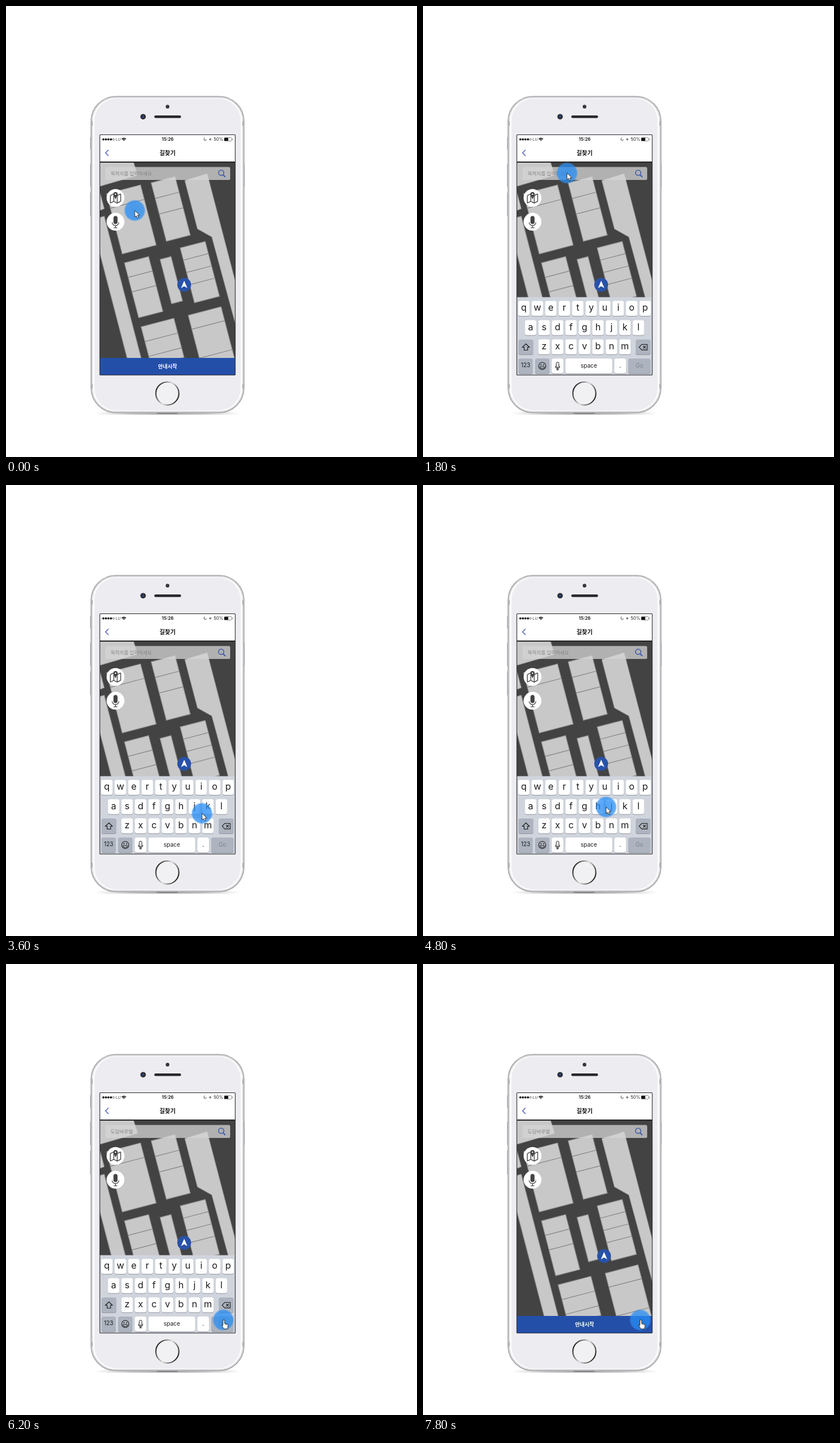
These frames come from a looping animation (715x783 px, 8 s). An HTML page with a canvas:

```html
<!DOCTYPE html>
<html lang="ko">
<head>
<meta charset="utf-8">
<title>길찾기</title>
<style>
html, body { margin: 0; width: 100%; height: 100%; overflow: hidden; background: #fff; }
canvas { display: block; }
</style>
</head>
<body>
<canvas id="stage" width="715" height="783"></canvas>
<script>
const ctx = document.getElementById('stage').getContext('2d');
const LOOP = 8000, STEP = 200;
const TYPE_ON = 1800, FILLED = 5600, HAND_ON = 5800, TYPE_OFF = 7400;
const KO = '"Noto Sans CJK KR", "Noto Sans CJK", sans-serif';
const EN = 'Inter, Roboto, sans-serif';
const INK = '#1c1c1c', LAND = '#c8c8c8', EDGE = '#909090', ACCENT = '#3c59ad';

function paint(fill, stroke, lw = 1) {
  if (fill) { ctx.fillStyle = fill; ctx.fill(); }
  if (stroke) { ctx.strokeStyle = stroke; ctx.lineWidth = lw; ctx.stroke(); }
}

function box(x, y, w, h, r, ...style) {
  ctx.beginPath();
  ctx.roundRect(x, y, w, h, r);
  paint(...style);
}

function disc(x, y, r, ...style) {
  ctx.beginPath();
  ctx.arc(x, y, r, 0, Math.PI * 2);
  paint(...style);
}

function arc(x, y, r, from, to, color, lw) {
  ctx.beginPath();
  ctx.arc(x, y, r, from * Math.PI, to * Math.PI);
  paint(null, color, lw);
}

function trace(points) {
  ctx.beginPath();
  for (let i = 0; i < points.length; i += 2) ctx.lineTo(points[i], points[i + 1]);
}

function poly(points, ...style) {
  trace(points);
  ctx.closePath();
  paint(...style);
}

function line(points, color, lw) {
  trace(points);
  paint(null, color, lw);
}

function text(s, x, y, font, color, align = 'center') {
  ctx.font = font;
  ctx.fillStyle = color;
  ctx.textAlign = align;
  ctx.fillText(s, x, y);
}

function at(x, y, turn, fn) {
  ctx.save();
  ctx.translate(x, y);
  ctx.rotate(turn);
  fn();
  ctx.restore();
}

function gradient(x0, y0, x1, y1, ...stops) {
  const g = ctx.createLinearGradient(x0, y0, x1, y1);
  stops.forEach((c, i) => g.addColorStop(i / (stops.length - 1), c));
  return g;
}

function drawPhone() {
  // ground shadow
  box(155, 705, 252, 4.5, 2, gradient(155, 0, 407, 0, '#fff', '#c4c4c6', '#a8a8aa', '#c4c4c6', '#fff'));
  box(262, 704, 37, 3.5, 1, '#4c4c4e');
  // side buttons
  for (const [x, y, h] of [[146.5, 227, 22], [146.5, 273, 41], [146.5, 323, 42], [412, 273, 41]])
    box(x, y + .5, 3, h, 1.5, '#e6e6e8', '#b2b2b6', .8);
  // body
  box(148, 157, 266, 549, 43, '#fbfbfc', '#a3a3a6', 1.6);
  box(149.8, 158.8, 262.4, 545.4, 41, null, '#d2d2d5', 1.6);
  box(154, 161, 254, 541, 38, '#ededf1');
  for (const y of [200, 656])
    for (const x of [147, 411]) box(x, y, 4, 8, 0, '#b5b5b8');
  // sensors
  disc(281, 174.7, 3.2, '#38383b');
  box(258, 190, 46.5, 4.6, 2.3, '#29292c');
  disc(238.5, 192.2, 4.8, '#2d2e35');
  disc(238.3, 192, 2, '#28468d');
  // home button
  disc(280.7, 672.7, 20, '#f1f1f4', gradient(262, 664, 299, 681, '#222', '#777', '#ddd', '#777', '#222'), 2);
}

function drawHeader() {
  ctx.fillStyle = '#fff';
  ctx.fillRect(163, 223, 236, 47);
  for (let i = 0; i < 4; i++) disc(169.4 + i * 4.4, 231.6, 1.9, '#111');
  disc(187, 231.6, 1.6, null, '#222', .6);
  text('LU', 190.8, 231.7, '6.4px ' + EN, '#333', 'left');
  for (const r of [1, 3, 5]) arc(205, 234.4, r, -.77, -.23, '#111', 1.3);
  text('15:26', 281.3, 231.7, '600 7.8px ' + EN, '#111');
  arc(346.6, 231, 2.2, .1, 1.4, '#777', 1.2);
  disc(355.3, 231.5, 2, '#8a8a8a');
  text('50%', 361.3, 231.7, '7.6px ' + EN, '#222', 'left');
  box(379.5, 228.5, 13, 6, 1, '#fff', '#777', .8);
  box(380, 229, 6.6, 5, .5, '#111');
  box(393.6, 230.2, 1.2, 2.6, .5, '#777');
  line([178.3, 249.8, 173.2, 255, 178.3, 260.2], '#5562bd', 1.5);
  text('길찾기', 281, 255, 'bold 10.2px ' + KO, '#111');
  ctx.fillStyle = '#262626';
  ctx.fillRect(163, 270, 236, 2);
}

// a tilted city block, cut into plots every `pitch` pixels
function block(x, y, w, h, cuts = 0, pitch = 0) {
  at(x, y, -.255, () => {
    box(0, 0, w, h, 0, LAND, EDGE, 1.2);
    for (let i = 1; i <= cuts; i++) line([0, i * pitch, w, i * pitch], '#858585', 1.2);
  });
}

function drawCity() {
  ctx.fillStyle = '#434343';
  ctx.fillRect(163, 271, 236, 370);
  poly([160, 268, 221, 268, 229, 294, 160, 314], LAND, EDGE);
  poly([163, 322, 171, 352, 163, 355], LAND, EDGE);
  poly([311, 303, 350, 291, 402, 490, 402, 563, 358, 401, 333, 387], LAND, EDGE);
  block(148, 371, 23.7, 280);
  block(175, 326, 61, 108, 1, 26);
  block(252.5, 307, 43, 105, 2, 28);
  block(206, 446, 43.5, 98.5, 2, 26);
  block(268, 440, 19.7, 79.5);
  block(303, 420, 45, 98.5, 3, 22);
  block(235, 557, 59, 70, 2, 26.5);
  block(317, 537, 59, 77, 1, 25);
  block(336.5, 611.5, 59, 20);
}

function drawMapIcon(x, y) {
  disc(x, y, 15.5, '#fff');
  const folds = [-9, -3, 3, 9], lift = i => i % 2 ? -2 : 1;
  const edge = dy => folds.flatMap((fx, i) => [x + fx, y + lift(i) + dy]);
  line(edge(-5), '#444', 1.4);
  line(edge(8), '#444', 1.4);
  folds.forEach((fx, i) => line([x + fx, y + lift(i) - 5, x + fx, y + lift(i) + 8], '#444', 1.4));
  poly([x - 3.5, y - 5, x + 3.5, y - 5, x, y + 2.5], '#444');
  disc(x, y - 6.5, 3.8, '#444');
  disc(x, y - 6.5, 1.2, '#fff');
}

function drawMic(x, y, k, color, solid) {
  box(x - 3.5 * k, y - 10 * k, 7 * k, 14 * k, 3.5 * k, solid && color, color, solid ? .1 : 1);
  arc(x, y + .8 * k, 5.8 * k, 0, 1, color, 1.2);
  line([x, y + 6.6 * k, x, y + 10.4 * k], color, 1.2);
  line([x - 3.2 * k, y + 10.4 * k, x + 3.2 * k, y + 10.4 * k], color, 1.2);
}

function drawMap(query, x, y) {
  drawCity();
  box(173, 279.5, 217, 22.5, 2.5, 'rgba(212,212,212,.76)');
  text(query, 182, 290.5, '8.45px ' + KO, '#858585', 'left');
  disc(374.3, 289.5, 4.6, null, ACCENT, 1.5);
  line([377.6, 293, 381.6, 297], ACCENT, 1.8);

  drawMapIcon(190.5, 333.2);
  disc(190.5, 374.6, 15.5, '#fff');
  drawMic(190.5, 374.6, 1, '#444', true);

  disc(x, y, 12, '#2852a9');
  poly([x, y - 7, x + 5.5, y + 5.7, x, y + 2.6, x - 5.5, y + 5.7], '#fff');
}

function key(x, y, w, label, dark, size = 16, color = INK) {
  box(x, y + 1, w, 26, 3.5, '#92969e');
  box(x, y, w, 26, 3.5, dark ? '#adb4bf' : '#fff');
  text(label, x + w / 2, y + 12.5, size + 'px ' + EN, color);
}

function drawKeyboard() {
  ctx.fillStyle = '#d0d4dc';
  ctx.fillRect(163, 505.5, 236, 136);
  ['qwertyuiop', 'asdfghjkl', 'zxcvbnm'].forEach((row, r) => {
    const left = 281 - (row.length - 1) * 11.72 - 10;
    [...row].forEach((c, i) => key(left + i * 23.44, 512 + r * 33.4, 20, c));
  });
  key(166, 579, 26, '', true);
  at(179, 592.5, 0, () =>
    poly([0, -6, 6, 0, 3, 0, 3, 5, -3, 5, -3, 0, -6, 0], null, INK, 1.2));
  key(370, 579, 26, '', true);
  at(383, 592.3, 0, () => {
    poly([-7, 0, -2.5, -4.8, 7, -4.8, 7, 4.8, -2.5, 4.8], null, INK, 1.1);
    for (const s of [-1, 1]) line([0, -2.3 * s, 4.5, 2.3 * s], INK, 1.1);
  });

  key(166, 612, 25, '123', true, 9.8);
  key(195, 612, 25, '', true);
  disc(207.5, 625, 6.2, null, INK, 1.1);
  for (const s of [-2.2, 2.2]) disc(207.5 + s, 623, .9, INK);
  ctx.beginPath();
  ctx.arc(207.5, 626, 3.8, 0, Math.PI);
  ctx.closePath();
  paint(null, INK, .9);
  key(224, 612, 20, '');
  drawMic(234.1, 624.8, .65, INK, false);
  key(248, 612, 81, 'space', false, 10);
  key(333, 612, 20, '.', false, 11);
  key(357, 612, 39, 'Go', true, 10, '#7e858f');
}

function drawButton() {
  ctx.fillStyle = '#244fa9';
  ctx.fillRect(163, 611, 236, 30);
  text('안내시작', 281, 625.5, 'bold 9px ' + KO, '#fff');
}

function drawPointer(x, y, hand) {
  const g = ctx.createRadialGradient(x, y, 0, x, y, 19);
  g.addColorStop(0, 'rgba(34,138,244,.78)');
  g.addColorStop(.86, 'rgba(40,142,245,.75)');
  g.addColorStop(1, 'rgba(50,150,245,0)');
  disc(x, y, 19, g);
  at(x, y, 0, () => {
    ctx.lineJoin = 'round';
    if (hand) {
      poly([-.6, 0, 2.2, 0, 2.2, 6, 8.4, 8, 7.6, 15.5, 1, 15.5, -3, 9, -.6, 9.3], '#fff', '#222', .9);
      for (const fx of [3.6, 5.8]) line([fx, 6.7, fx, 9.2], '#555', .6);
    } else {
      poly([0, 0, 0, 11.6, 2.7, 9.2, 4.5, 13.2, 6.6, 12.2, 4.8, 8.4, 8.4, 8.2], '#fff', '#222', .9);
    }
  });
}

// time, x, y of the pointer's stops
const path = [
  [0, 224, 355], [400, 250.5, 290], [TYPE_ON, 250.5, 290], [3000, 310.5, 527],
  [3600, 341, 570], [4200, 335, 549], [4800, 318.5, 559], [HAND_ON, 378, 618], [LOOP, 378, 618]
];

function pointerAt(t) {
  const i = path.findIndex(p => p[0] > t);
  const [t0, x0, y0] = path[i - 1], [t1, x1, y1] = path[i];
  const u = (t - t0) / (t1 - t0), k = u * u * (3 - 2 * u);
  return [x0 + (x1 - x0) * k, y0 + (y1 - y0) * k];
}

function draw(t) {
  const found = t >= TYPE_OFF;
  ctx.fillStyle = '#fff';
  ctx.fillRect(0, 0, 715, 783);
  ctx.textBaseline = 'middle';
  drawPhone();

  ctx.save();
  ctx.beginPath();
  ctx.rect(163, 223, 236, 418);
  ctx.clip();
  drawMap(t < FILLED ? '목적지를 입력하세요' : '도담바루텔', found ? 315 : 310, found ? 507 : 484);
  drawHeader();
  if (t >= TYPE_ON && !found) drawKeyboard(); else drawButton();
  ctx.restore();

  box(163.2, 223.5, 235.6, 417.3, 1, null, '#27272b', 1.1);
  drawPointer(...pointerAt(t), t >= HAND_ON);
}

const start = performance.now();
function tick() {
  const t = (performance.now() - start) % LOOP;
  draw(Math.floor(t / STEP) * STEP);
  requestAnimationFrame(tick);
}
tick();
</script>
</body>
</html>
```
